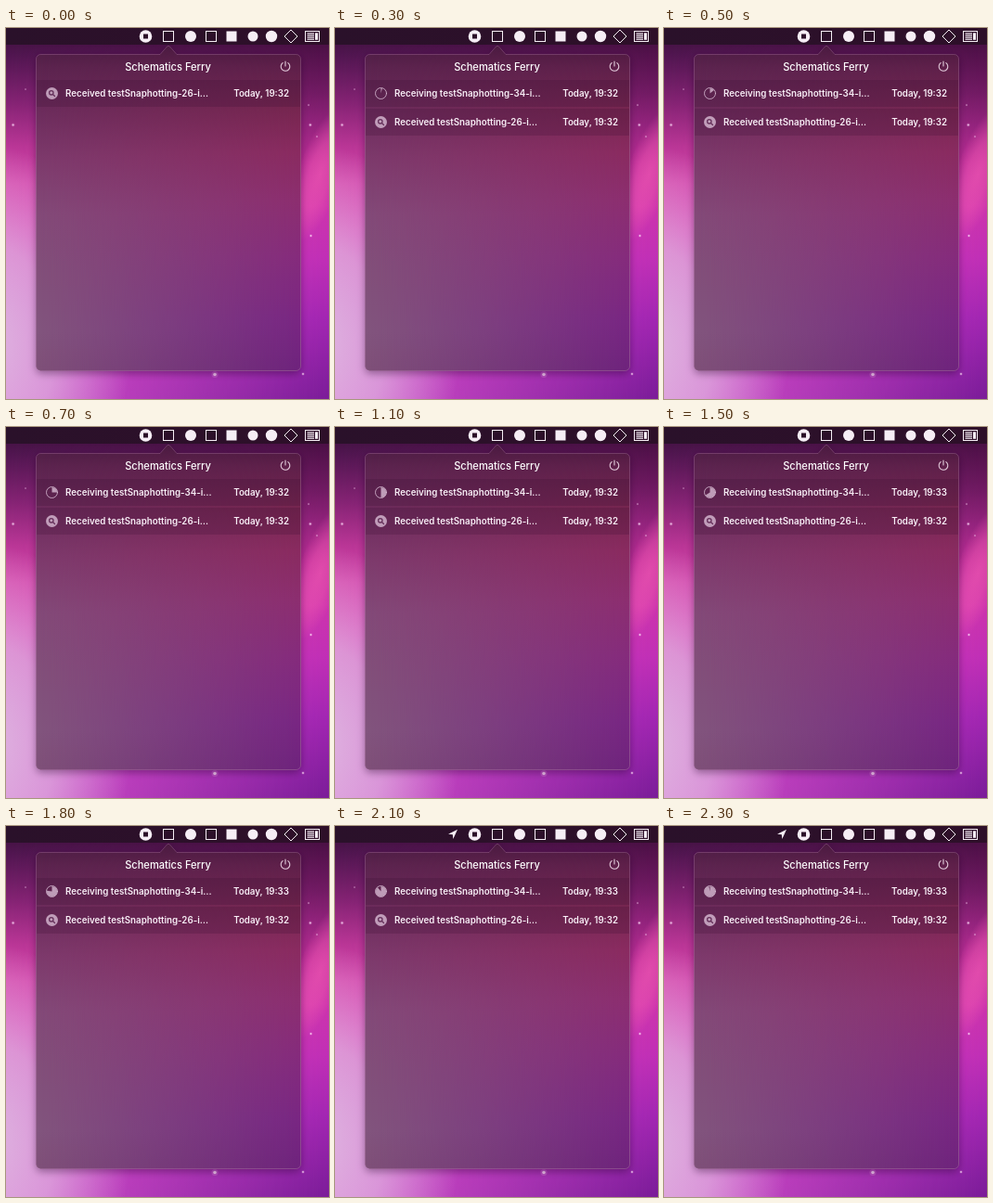
Animation, 348 px wide and 400 px high, one loop 2.4 s. Source, as an HTML page with a canvas:

```html
<!DOCTYPE html>
<html lang="en">
<head>
<meta charset="utf-8">
<title>Transfers</title>
<style>
html, body { margin: 0; width: 100%; height: 100%; overflow: hidden; background: #2a1028; }
canvas { display: block; width: 348px; height: 400px; }
</style>
</head>
<body>
<canvas id="stage"></canvas>
<script>
const W = 348, H = 400, LOOP = 2400, STEP = 100;
const dpr = window.devicePixelRatio || 1;
const FONT = 'Inter, "Open Sans", sans-serif';
const SOFT = 'rgba(238,214,234,0.68)';

function layer(canvas) {
  canvas.width = W * dpr;
  canvas.height = H * dpr;
  const c = canvas.getContext('2d');
  c.scale(dpr, dpr);
  return c;
}

const ctx = layer(document.getElementById('stage'));
const backdrop = document.createElement('canvas');

function gradient(c, x0, y0, x1, y1, stops) {
  const g = c.createLinearGradient(x0, y0, x1, y1);
  stops.forEach(([at, color]) => g.addColorStop(at, color));
  return g;
}

// Two vertical gradients that cross-fade from left to right.
function blend(c, x, y, w, h, left, right) {
  c.fillStyle = gradient(c, 0, y, 0, y + h, left);
  c.fillRect(x, y, w, h);
  const top = document.createElement('canvas');
  const t = layer(top);
  t.fillStyle = gradient(t, 0, y, 0, y + h, right);
  t.fillRect(x, y, w, h);
  t.globalCompositeOperation = 'destination-in';
  t.fillStyle = gradient(t, x, 0, x + w, 0, [[0, 'rgba(0,0,0,0)'], [1, '#000']]);
  t.fillRect(x, y, w, h);
  c.drawImage(top, 0, 0, W, H);
}

// Soft elliptical light; rgb is a "r,g,b" string.
function glow(c, x, y, rx, ry, turn, rgb, alpha) {
  c.save();
  c.translate(x, y);
  c.rotate(turn);
  c.scale(rx, ry);
  const g = c.createRadialGradient(0, 0, 0, 0, 0, 1);
  g.addColorStop(0, `rgba(${rgb},${alpha})`);
  g.addColorStop(0.5, `rgba(${rgb},${alpha * 0.7})`);
  g.addColorStop(1, `rgba(${rgb},0)`);
  c.fillStyle = g;
  c.fillRect(-1, -1, 2, 2);
  c.restore();
}

function disc(c, x, y, r, color) {
  c.fillStyle = color;
  c.beginPath();
  c.arc(x, y, r, 0, Math.PI * 2);
  c.fill();
}

function poly(c, points, close) {
  c.beginPath();
  points.forEach(([x, y]) => c.lineTo(x, y));
  if (close) c.closePath();
}

function panelPath(c) {
  const l = 32.5, t = 28.5, r = 317.5, b = 369.5, k = 5;
  c.beginPath();
  c.moveTo(l + k, t);
  c.lineTo(166, t);
  c.lineTo(173.5, 20);
  c.quadraticCurveTo(175, 18.5, 176.5, 20);
  c.lineTo(184, t);
  c.arcTo(r, t, r, b, k);
  c.arcTo(r, b, l, b, k);
  c.arcTo(l, b, l, t, k);
  c.arcTo(l, t, r, t, k);
  c.closePath();
}

function drawSky(c) {
  blend(c, 0, 0, W, H,
    [[0, '#3a1038'], [0.07, '#501650'], [0.2, '#852374'], [0.32, '#bb3797'], [0.42, '#d748ad'],
     [0.55, '#db46b6'], [0.75, '#d548c4'], [1, '#dc52d0']],
    [[0, '#3c0e38'], [0.07, '#54124c'], [0.17, '#701a62'], [0.26, '#92237c'], [0.36, '#b82c94'],
     [0.48, '#cc34ac'], [0.62, '#c02fb6'], [0.78, '#a226b2'], [1, '#7a1c98']]);
  glow(c, -25, 340, 160, 215, 0, '222,182,224', 1);
  glow(c, 338, 158, 24, 75, 0.32, '236,84,178', 0.75);
  [[7.6, 104.4, 1], [327.8, 104.6, 1], [326, 83, 0.6], [335, 117, 0.6], [328.5, 224, 0.9],
   [320, 373, 0.9], [21, 66, 0.5], [225, 373.5, 1.8]].forEach(([x, y, r]) => {
    disc(c, x, y, r * 2, 'rgba(255,190,245,0.2)');
    disc(c, x, y, r, 'rgba(255,225,250,0.8)');
  });
}

function drawPanel(c) {
  c.save();
  c.shadowColor = 'rgba(30,0,35,0.4)';
  c.shadowBlur = 9 * dpr;
  c.shadowOffsetY = 3 * dpr;
  c.fillStyle = '#6a2860';
  panelPath(c);
  c.fill();
  c.restore();
  c.save();
  panelPath(c);
  c.clip();
  blend(c, 32, 18, 286, 352,
    [[0, '#4a1c42'], [0.07, '#5c244f'], [0.2, '#6c2c5c'], [0.35, '#7d3a6c'], [0.52, '#834a78'],
     [0.7, '#82507a'], [0.88, '#82557d'], [1, '#7e5078']],
    [[0, '#4a183e'], [0.07, '#5f204a'], [0.2, '#772650'], [0.33, '#8a2b60'], [0.48, '#8c2e70'],
     [0.65, '#852b7c'], [0.85, '#782683'], [1, '#6e237c']]);
  c.restore();
  c.strokeStyle = 'rgba(255,205,240,0.17)';
  c.lineWidth = 1;
  panelPath(c);
  c.stroke();
}

function drawBar(c) {
  c.fillStyle = gradient(c, 0, 0, W, 0, [[0, '#2a112a'], [1, '#2e0f29']]);
  c.fillRect(0, 0, W, 18);
  const ink = '#f6eef5';
  disc(c, 150.5, 9, 6.8, ink);
  c.fillStyle = '#2b0e27';
  c.fillRect(148, 6.5, 5, 5);

  c.strokeStyle = ink;
  c.lineWidth = 1;
  c.strokeRect(169.5, 3.5, 11, 11);
  disc(c, 199, 9, 6, ink);
  c.strokeRect(215.5, 3.5, 11, 11);
  c.fillStyle = ink;
  c.fillRect(237.5, 3.5, 11, 11);
  disc(c, 266, 9, 5.5, ink);
  disc(c, 286, 9, 6.2, ink);
  poly(c, [[307, 2], [314, 9], [307, 16], [300, 9]], true);
  c.stroke();

  c.strokeRect(322.5, 3.5, 15, 11);
  c.fillStyle = ink;
  for (let y = 0; y < 4; y++) c.fillRect(324.5, 5.3 + y * 2.1, 7.5, 1.2);
  c.fillRect(333, 5.3, 3, 7.5);
}

function drawHeader(c) {
  c.fillStyle = '#fff';
  c.font = '500 11.1px ' + FONT;
  c.textAlign = 'center';
  c.fillText('Schematics Ferry', 174.5, 46);
  c.strokeStyle = 'rgba(250,235,246,0.85)';
  c.lineWidth = 1.1;
  c.lineCap = 'round';
  c.beginPath();
  c.arc(301, 41.5, 4.8, -Math.PI * 0.3, Math.PI * 1.3);
  c.moveTo(301, 36);
  c.lineTo(301, 41);
  c.stroke();
}

function drawRow(cy, label, time) {
  ctx.fillStyle = '#f8eef6';
  ctx.font = '600 9.75px ' + FONT;
  ctx.textAlign = 'left';
  ctx.fillText(label, 64, cy + 3.5);
  ctx.textAlign = 'right';
  ctx.fillText(time, 305, cy + 3.5);
}

function drawBand(cy) {
  ctx.fillStyle = 'rgba(50,10,45,0.2)';
  ctx.fillRect(33, cy - 14, 284, 29);
}

function drawLens(cy) {
  disc(ctx, 49.5, cy + 0.5, 6.5, SOFT);
  ctx.strokeStyle = '#64305a';
  ctx.lineWidth = 1.3;
  ctx.lineCap = 'round';
  ctx.beginPath();
  ctx.arc(48.8, cy - 0.2, 2.2, 0, Math.PI * 2);
  ctx.moveTo(50.5, cy + 1.5);
  ctx.lineTo(52.5, cy + 3.5);
  ctx.stroke();
}

function drawPie(cy, part) {
  const x = 49.5, y = cy + 0.5, up = -Math.PI / 2;
  ctx.strokeStyle = SOFT;
  ctx.lineWidth = 1;
  ctx.beginPath();
  ctx.arc(x, y, 6, 0, Math.PI * 2);
  ctx.stroke();
  ctx.fillStyle = SOFT;
  ctx.beginPath();
  ctx.moveTo(x, y);
  ctx.arc(x, y, 5.6, up, up + part * Math.PI * 2);
  ctx.fill();
}

function drawPointer() {
  ctx.fillStyle = '#f6eef5';
  poly(ctx, [[132, 3.8], [122, 8.8], [126.8, 9.3], [127.3, 14]], true);
  ctx.fill();
}

const PROGRESS = [[100, 0], [300, 0.04], [700, 0.25], [1100, 0.5], [1500, 0.66], [1800, 0.77], [2300, 0.97]];

function progress(t) {
  for (let i = 1; i < PROGRESS.length; i++) {
    const [t0, p0] = PROGRESS[i - 1], [t1, p1] = PROGRESS[i];
    if (t <= t1) return p0 + (p1 - p0) * Math.max(0, (t - t0) / (t1 - t0));
  }
  return 0.97;
}

function draw(now) {
  const t = Math.floor((now % LOOP) / STEP) * STEP;
  const slide = 1 - (1 - Math.min(1, t / 250)) ** 2;
  ctx.drawImage(backdrop, 0, 0, W, H);
  if (t >= 2100) drawPointer();

  const oldY = 70 + 31 * slide;
  drawBand(oldY);
  drawLens(oldY);
  drawRow(oldY, 'Received testSnaphotting-26-i…', 'Today, 19:32');
  if (t > 0) {
    ctx.save();
    ctx.beginPath();
    ctx.rect(33, 55, 284, oldY - 70);
    ctx.clip();
    ctx.globalAlpha = slide;
    const newY = 39 + 31 * slide;
    drawBand(newY);
    drawPie(newY, progress(t));
    drawRow(newY, 'Receiving testSnaphotting-34-i…', t < 1300 ? 'Today, 19:32' : 'Today, 19:33');
    ctx.restore();
  }
}

const base = layer(backdrop);
drawSky(base);
drawBar(base);
drawPanel(base);
drawHeader(base);

const start = performance.now();
function tick() {
  draw(performance.now() - start);
  requestAnimationFrame(tick);
}
tick();
</script>
</body>
</html>
```
